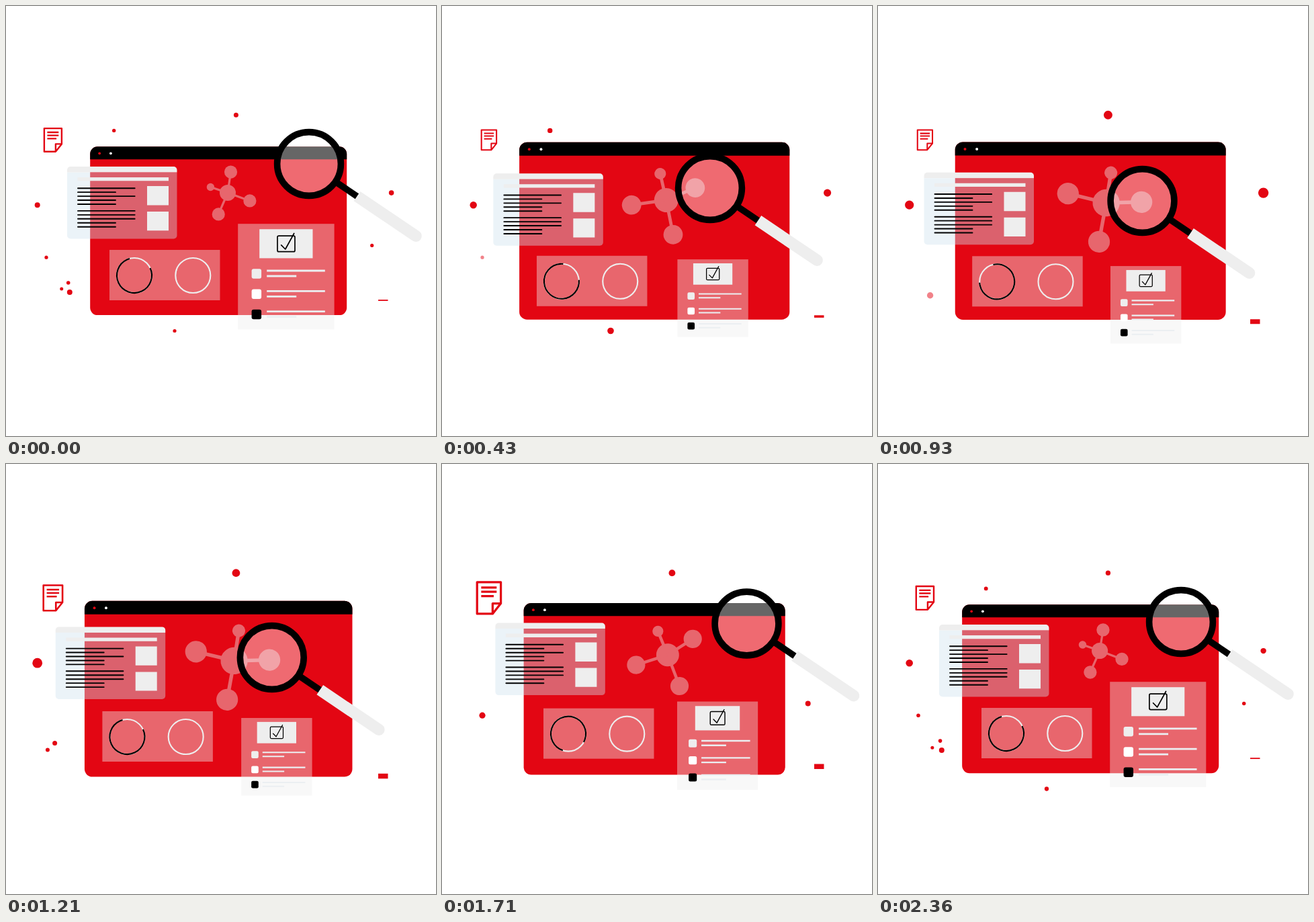
These frames come from a looping animation (640 px wide and 640 px high, 2.43 s). An HTML page:

```html
<!DOCTYPE html>
<html lang="en">
<head>
<meta charset="utf-8">
<title>Research dashboard</title>
<style>
  html, body { margin: 0; width: 100%; height: 100%; overflow: hidden; background: #fff; }
  svg { display: block; width: 100%; height: 100%; }
</style>
</head>
<body>
<svg viewBox="0 0 640 640">
  <g id="dots" fill="#e30613"></g>
  <rect id="dash" x="554" width="14.5" fill="#e30613"/>

  <g id="doc" fill="none" stroke="#e30613" stroke-width="2.4" stroke-linejoin="round">
    <path d="M-13-17.3H13V6L4 17.3H-13ZM4 17.3V6H13"/>
    <path d="M-8.5-11.4H8.4M-8.5-6.8H8.4M-8.5-2H5.2"/>
  </g>

  <g id="browser">
    <rect x="-191" y="-125.4" width="382" height="250.8" rx="11" fill="#e30613"/>
    <path d="M-191-106.4V-114.4A11 11 0 0 1-180-125.4H180A11 11 0 0 1 191-114.4V-106.4Z"/>
    <circle cx="-177" cy="-115.4" r="1.9" fill="#e30613"/>
    <circle cx="-160.3" cy="-115.4" r="1.9" fill="#fff"/>
  </g>

  <g id="article">
    <path d="M0 8.5H163.5V102.5A5 5 0 0 1 158.5 107.5H5A5 5 0 0 1 0 102.5Z" fill="rgb(206,226,238)" fill-opacity=".41"/>
    <path d="M0 8.5V5A5 5 0 0 1 5 0H158.5A5 5 0 0 1 163.5 5V8.5Z" fill="#eee"/>
    <path d="M15.5 16H151V21.3H15.5ZM119 29H151V57.4H119ZM119 67H151V95.2H119Z" fill="#eee"/>
    <path id="copy" fill="none" stroke="#000" stroke-width="1.9" stroke-linecap="round"/>
  </g>

  <g id="charts" fill="none" stroke-width="2.1">
    <rect width="164.5" height="75" fill="#eee" fill-opacity=".41"/>
    <circle cx="37" cy="38" r="26" stroke="#eee"/>
    <circle cx="124.3" cy="38" r="26" stroke="#eee"/>
    <circle id="ring" r="26" stroke="#000" pathLength="360" stroke-dasharray="280 80"/>
  </g>

  <g id="molecule" opacity=".41" fill="#eee"></g>

  <g id="list">
    <rect width="143.4" height="157" fill="#eee" fill-opacity=".41"/>
    <rect x="32" y="8" width="79.3" height="43.2" fill="#eee"/>
    <g fill="none" stroke="#000" stroke-width="1.7" stroke-linecap="round" stroke-linejoin="round">
      <rect x="58.8" y="17.9" width="26" height="23.6" rx="2"/>
      <path d="M64.5 31.6L70.6 37.8L83.5 14.3"/>
    </g>
  </g>

  <g id="glass">
    <g transform="rotate(34)">
      <rect x="46" y="-4.8" width="41" height="9.6"/>
      <path d="M86.2-8.6H192A8.6 8.6 0 0 1 192 8.6H86.2Z" fill="#eee"/>
    </g>
    <circle r="47.4" fill="#fff" fill-opacity=".4"/>
    <circle r="47.4" fill="none" stroke="#000" stroke-width="9.6"/>
  </g>
</svg>

<script>
const LOOP = 2430, FRAMES = 34, FPS = 14;
const el = id => document.getElementById(id);

function set(node, attrs) {
  for (const name in attrs) node.setAttribute(name, attrs[name]);
  return node;
}

function add(parent, tag, attrs) {
  return parent.appendChild(set(document.createElementNS("http://www.w3.org/2000/svg", tag), attrs));
}

const part = (k, from, to) => Math.min(1, Math.max(0, (k - from) / (to - from)));
const ease = (k, from, to) => (1 - Math.cos(Math.PI * part(k, from, to))) / 2;
const easeOut = (k, from, to) => 1 - (1 - part(k, from, to)) ** 2;

// Goes from 0 to 1 between a and b, and back between c and d.
const swing = (k, a, b, c, d) => ease(k, a, b) - ease(k, c, d);

// Dots shrink to their rest size at the loop point, then grow again.
const dots = [
  { x: 46.7, y: 296.2, rest: 4, shrink: 1.3, grow: .2, from: 31, to: 54 },
  { x: 342.4, y: 162.2, rest: 3.5, shrink: .14, grow: .6, from: 12, to: 38 },
  { x: 160.7, y: 185.4, rest: 2.7, shrink: .22, grow: .17, from: 26, to: 46 },
  { x: 573.6, y: 278.1, rest: 3.8, shrink: .42, grow: .3, from: 27, to: 48 },
  { x: 60, y: 374.2, rest: 2.6, shrink: .2, grow: 0, from: 21, to: 40 },
  { x: 544.7, y: 356.4, rest: 2.6, shrink: .14, grow: 0, from: 21, to: 37 },
  { x: 251, y: 483.5, rest: 2.6, shrink: .55, grow: .37, from: 30, to: 42 }
];

// Sparks keep their size and drift up to the right as they appear.
const sparks = [
  { x: 94.8, y: 426, rest: 4, from: 29, to: 36 },
  { x: 92.7, y: 412, rest: 2.8, from: 29.4, to: 36 },
  { x: 83.5, y: 420.5, rest: 2.5, from: 31, to: 36 },
  { x: 77.6, y: 430.7, rest: 4.7, from: 8, to: 13 },
  { x: 73.4, y: 415, rest: 3.5, from: 14, to: 20 },
  { x: 62.7, y: 425, rest: 3, from: 14, to: 20 }
].map(spark => ({ ...spark, shrink: 0, grow: 0, drift: 5.3 }));

const specks = [...dots, ...sparks];
for (const speck of specks) speck.node = add(el("dots"), "circle", {});

function drawSpeck({ node, x, y, rest, shrink, grow, from, to, drift = 0 }, k) {
  const at = k < from - 1 ? k + FRAMES : k;
  const shift = drift * (1 - ease(at, from, from + 4));
  const age = at - FRAMES;
  set(node, {
    cx: x - shift,
    cy: y + shift * .65,
    r: rest + (age < 0 ? -age * shrink : age * grow),
    opacity: Math.max(0, Math.min(1, (at - from + 1) / 2, (to - at + 1) / 2))
  });
}

const rows = (top, longs) =>
  [0, 1, 2, 3, 4].map(i => `M16 ${top + i * 5.95}H${longs.includes(i) ? 100.7 : 72}`).join("");
set(el("copy"), { d: rows(32.2, [0, 2]) + rows(65.9, [0, 1, 2]) });

// Atoms as [angle, distance, radius] around the core.
for (const [angle, far, r] of [[0, 0, 12], [198.5, 27, 5.7], [278.3, 31.3, 9.6], [20, 35, 9.6], [113.3, 34.8, 9.6]]) {
  const turn = angle * Math.PI / 180;
  const x = far * Math.cos(turn), y = far * Math.sin(turn);
  add(el("molecule"), "line", { x2: x, y2: y, stroke: "#eee", "stroke-width": 3.2 });
  add(el("molecule"), "circle", { cx: x, cy: y, r });
}

["#eee", "#fff", "#000"].forEach((fill, i) => {
  const y = 67 + i * 30.3;
  add(el("list"), "rect", { x: 20.4, y, width: 14.5, height: 14.5, rx: 3, fill });
  add(el("list"), "path", { d: `M43 ${y + 1.4}h86.6v2.8h-86.6zM43 ${y + 9.4}h44v2.8h-44z`, fill: "#ebeff2" });
});

function place(id, x, y, size = 1, turn = 0) {
  set(el(id), { transform: `translate(${x} ${y}) rotate(${turn}) scale(${size})` });
}

// Frames start on multiples of 10 ms.
function frameAt(time) {
  const k = Math.round(time * FPS / 1000);
  return Math.min(FRAMES - 1, Math.round(k * 100 / FPS) * 10 > time ? k - 1 : k);
}

function draw(k) {
  place("browser", 316.2, 334.7, 1 + .062 * swing(k, 0, 8, 7, 34));

  place("doc", 69.9, 199.4, 1 - .21 * ease(k, 0, 10) + .57 * ease(k, 10, 23.5) - .36 * ease(k, 24, 34));

  place("article",
    91 - 24 * ease(k, 0, 10.5) + 12 * ease(k, 10, 23) + 12 * ease(k, 23, 32),
    239 + 12 * ease(k, 0, 8) - 14.4 * ease(k, 8, 24) + 2.4 * ease(k, 29, 33));

  place("charts",
    154 - 14.6 * swing(k, 0, 7.6, 10, 30),
    363 + 13.4 * (ease(k, 0, 10) - easeOut(k, 10, 28)));
  place("ring", 37, 38, 1, -25 + 360 * swing(k, 4, 17, 17, 29));

  const dip = swing(k, 6, 10, 11, 18);
  place("list",
    345.2 + 5.2 * swing(k, 0, 6, 22, 33) - 5.5 * dip,
    324.2 + 53.7 * swing(k, 0, 6.5, 16, 33) + 11.3 * dip,
    1 - .265 * swing(k, 0, 6, 16.5, 34));

  const spin = swing(k, 0, 9.2, 16.5, 34);
  place("molecule",
    330 + 9.6 * swing(k, 3, 10, 16.5, 34),
    278 + 15 * swing(k, 0, 9.2, 16.5, 30),
    1 + .68 * spin, 80.4 * spin);

  const recoil = 2.5 * swing(k, 16, 24, 24, 28);
  place("glass",
    451 - 57.5 * swing(k, 0, 7.5, 16, 24) + recoil,
    235 + 55 * swing(k, 0, 10, 16, 24) + recoil);

  const height = 1.8 + 5.7 * swing(k, 0, 16, 24, 33.5);
  set(el("dash"), { y: 438 + 33 * swing(k, 0, 9.2, 10, 34) - height / 2, height });

  for (const speck of specks) drawSpeck(speck, k);
}

const began = performance.now();
function tick() {
  draw(frameAt((performance.now() - began) % LOOP));
  requestAnimationFrame(tick);
}
tick();
</script>
</body>
</html>
```
